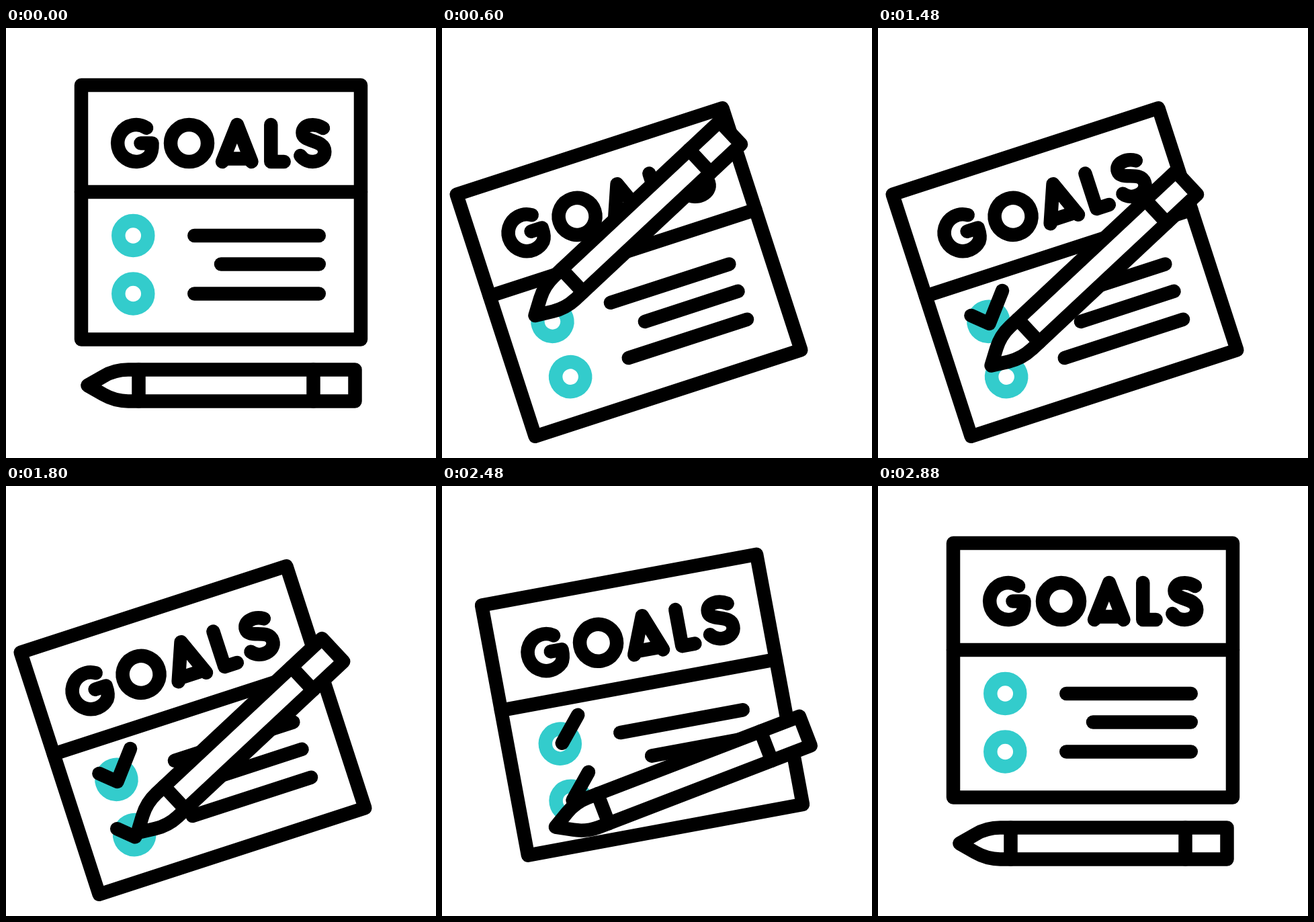
Recreate the animation shown at these times as an HTML page with a canvas. Size 640x640 px, loop 3 s.

```html
<!DOCTYPE html>
<html lang="en">
<head>
<meta charset="utf-8">
<title>Goals checklist</title>
<style>
  html, body { margin: 0; width: 100%; height: 100%; overflow: hidden; background: #fff; }
  canvas { display: block; width: 100vmin; height: 100vmin; }
</style>
</head>
<body>
<canvas id="stage" width="640" height="640" role="img" aria-label="GOALS"></canvas>
<script>
const ctx = document.getElementById('stage').getContext('2d');
const LOOP = 3000, STEP = 40, WEIGHT = 20.5;
const INK = '#000', PAPER = '#fff', ACCENT = '#33cccc';
const RAD = Math.PI / 180;

// Pivot of the sheet at rest and while it is being written on
const REST = [320, 274.3], DESK = [278, 363.5], SHEET_TILT = -18;
const PEN_TILT = -43.1;
const PEN_REST = [121.5, 532];
const CHECK = [[167.4, 292.5], [189.4, 312.3], [223.1, 271.7]];
const ROW_GAP = 86.5;

const smooth = (t, from, to) => {
  const s = Math.min(1, Math.max(0, (t - from) / (to - from)));
  return s * s * (3 - 2 * s);
};
const mix = (a, b, p) => a + (b - a) * p;
const mixPoint = (a, b, p) => [mix(a[0], b[0], p), mix(a[1], b[1], p)];
const bend = (p, a, b) =>
  3 * p * (1 - p) ** 2 * a + 3 * p * p * (1 - p) * b + p ** 3;
const quad = (a, c, b, p) => mixPoint(mixPoint(a, c, p), mixPoint(c, b, p), p);

function draw(path, fill, color = INK) {
  ctx.beginPath();
  path();
  if (fill) {
    ctx.fillStyle = fill;
    ctx.fill();
  }
  ctx.strokeStyle = color;
  ctx.stroke();
}

function line(...points) {
  draw(() => points.forEach(p => ctx.lineTo(...p)));
}

function ring(x, y, r, color) {
  draw(() => ctx.arc(x, y, r, 0, 2 * Math.PI), null, color);
}

const legs = CHECK.slice(1).map((p, i) =>
  Math.hypot(p[0] - CHECK[i][0], p[1] - CHECK[i][1]));
const bendAt = legs[0] / (legs[0] + legs[1]);

function checkPoint(p, row) {
  const [x, y] = p < bendAt
    ? mixPoint(CHECK[0], CHECK[1], p / bendAt)
    : mixPoint(CHECK[1], CHECK[2], (p - bendAt) / (1 - bendAt));
  return [x, y + row * ROW_GAP];
}

function check(row, from, to) {
  if (to <= from) return;
  const points = [checkPoint(from, row)];
  if (from < bendAt && to > bendAt) points.push(checkPoint(bendAt, row));
  points.push(checkPoint(to, row));
  line(...points);
}

function onDesk([x, y]) {
  const c = Math.cos(SHEET_TILT * RAD), s = Math.sin(SHEET_TILT * RAD);
  const dx = x - REST[0], dy = y - REST[1];
  return [DESK[0] + dx * c - dy * s, DESK[1] + dx * s + dy * c];
}

function lettering() {
  draw(() => {
    ctx.arc(193.7, 171.5, 27.5, -56 * RAD, 45 * RAD, true);
    ctx.quadraticCurveTo(218, 185, 217.5, 171.5);
    ctx.lineTo(200.5, 171.5);
  });
  ring(272.5, 171.5, 27.5, INK);
  line([322, 199], [344, 144], [365.5, 199]);
  line([327, 194.5], [361, 194.5]);
  line([394.3, 144], [394.3, 199], [413.7, 199]);
  draw(() => {
    ctx.moveTo(472, 149);
    ctx.bezierCurveTo(459, 141, 441.5, 143, 441.5, 156);
    ctx.bezierCurveTo(441.5, 171, 474.3, 165, 474.3, 184);
    ctx.bezierCurveTo(474.3, 201, 448, 204, 438.3, 190);
  });
}

function sheet(pose, drawn, erased) {
  ctx.save();
  ctx.translate(pose.x, pose.y);
  ctx.rotate(pose.angle * RAD);
  ctx.translate(-REST[0], -REST[1]);
  draw(() => ctx.rect(112, 85, 416, 378.6), PAPER);
  line([112, 244], [528, 244]);
  lettering();
  line([280.3, 309], [465.8, 309]);
  line([320, 351.5], [465.8, 351.5]);
  line([280.3, 395.5], [465.8, 395.5]);
  drawn.forEach((p, row) => {
    ring(189.3, 309 + row * ROW_GAP, 22, ACCENT);
    check(row, erased, p);
  });
  ctx.restore();
}

// The pen has its tip at the local origin and points left
function pen([x, y], angle) {
  ctx.save();
  ctx.translate(x, y);
  ctx.rotate(angle * RAD);
  draw(() => {
    ctx.moveTo(0, 0);
    ctx.arcTo(40.5, -23.4, 61, -23.4, 74);
    ctx.lineTo(398, -23.4);
    ctx.lineTo(398, 23.4);
    ctx.lineTo(61, 23.4);
    ctx.arcTo(40.5, 23.4, 0, 0, 74);
    ctx.closePath();
  }, PAPER);
  line([76, -23.4], [76, 23.4]);
  line([336, -23.4], [336, 23.4]);
  ctx.restore();
}

function sheetPose(t) {
  const go = smooth(t, 80, 600), back = smooth(t, 2160, 2880);
  const px = back ? 1 - bend(back, 0.37, 0.81) : bend(go, 0.36, 0.7);
  const py = back ? 1 - bend(back, 0.21, 0.86) : bend(go, 1.07, 1.3);
  return {
    x: mix(REST[0], DESK[0], px),
    y: mix(REST[1], DESK[1], py),
    angle: SHEET_TILT * (go - back)
  };
}

function writing(p, row) {
  const [x, y] = onDesk(checkPoint(p, row));
  return [x + 4.8 * p, y - 6.2 * p];
}

function penTip(t, drawn) {
  if (t < 600) return mixPoint(PEN_REST, writing(0, 0), smooth(t, 80, 600));
  if (t < 1240) return writing(drawn[0], 0);
  if (t < 1520) {
    return quad(writing(1, 0), [196, 440], writing(0, 1), smooth(t, 1240, 1520));
  }
  if (t < 2160) return writing(drawn[1], 1);
  return quad(writing(1, 1), [171, 514], PEN_REST, smooth(t, 2160, 2790));
}

function render(t) {
  const drawn = [smooth(t, 600, 1240), smooth(t, 1520, 2160)];
  ctx.fillStyle = PAPER;
  ctx.fillRect(0, 0, 640, 640);
  ctx.lineWidth = WEIGHT;
  ctx.lineCap = ctx.lineJoin = 'round';
  sheet(sheetPose(t), drawn, smooth(t, 2160, 2880));
  pen(penTip(t, drawn), PEN_TILT * (smooth(t, 110, 600) - smooth(t, 2160, 2790)));
}

const start = performance.now();
function tick() {
  const t = (performance.now() - start) % LOOP;
  render(Math.floor(t / STEP) * STEP);
  requestAnimationFrame(tick);
}
tick();
</script>
</body>
</html>
```
